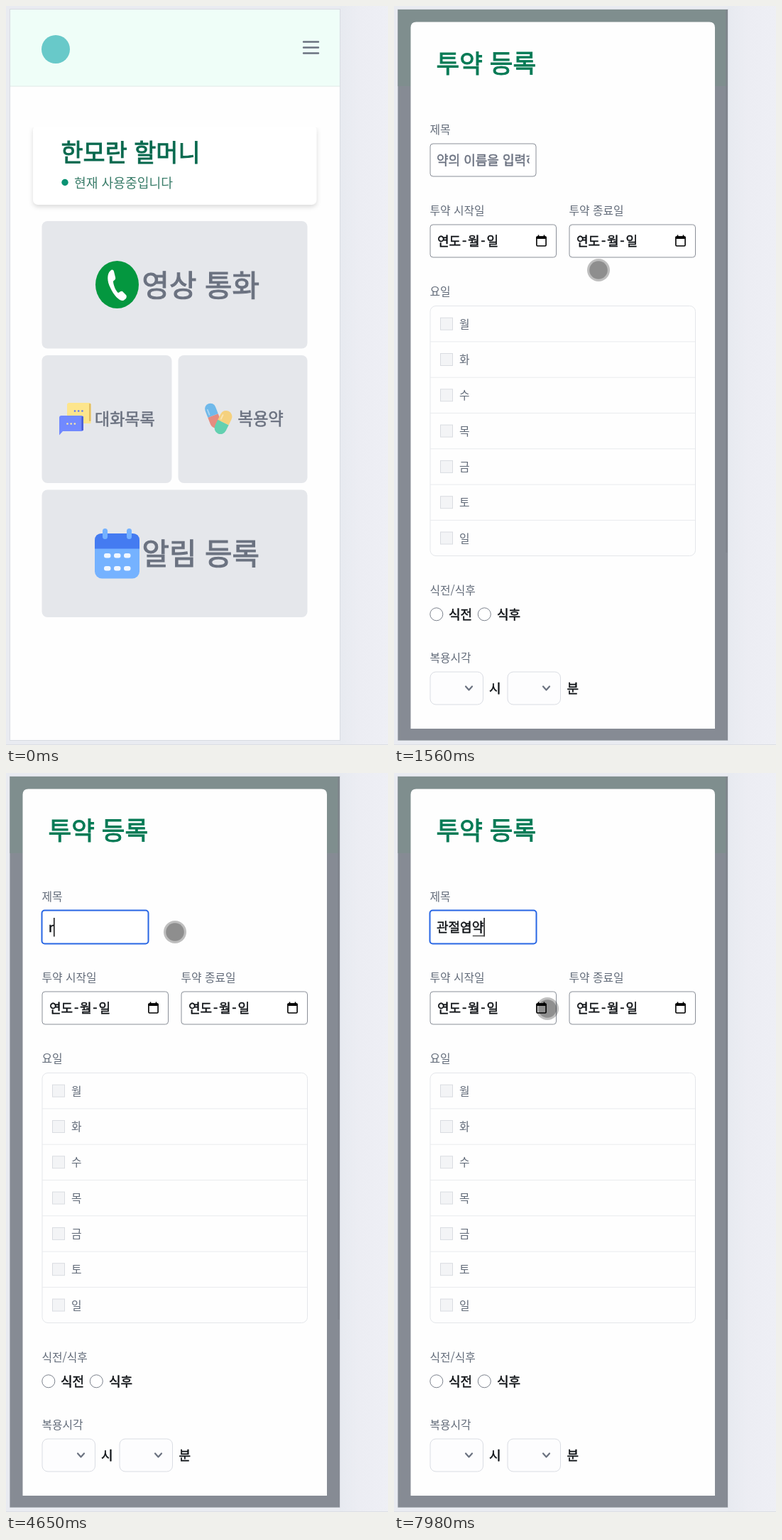
These frames come from a looping animation (538x1041 px, 8000 ms). An HTML page:

```html
<!DOCTYPE html>
<html lang="ko">
<head>
<meta charset="utf-8">
<title>투약 등록</title>
<style>
  html, body { margin: 0; width: 100%; height: 100%; overflow: hidden; background: #ebedf3; }
  svg { display: block; width: 538px; height: 1041px; }
  text { font-family: "Noto Sans CJK KR", "Noto Sans CJK", "Noto Sans", sans-serif; white-space: pre; }
  .card { filter: drop-shadow(0 3px 3px rgba(0, 0, 0, .14)); }
</style>
</head>
<body>
<svg id="stage" viewBox="0 0 538 1041" xmlns="http://www.w3.org/2000/svg"></svg>
<script>
const LOOP = 8000;
const GRAY = '#6b7280', GREEN = '#057a55', INK = '#111418', LABEL = '#626b79';

const box = (x1, y1, x2, y2, r, fill, stroke = 'none', w = 1, extra = '') =>
  `<rect x="${x1}" y="${y1}" width="${x2 - x1}" height="${y2 - y1}" rx="${r}" fill="${fill}" stroke="${stroke}" stroke-width="${w}" ${extra}/>`;
const dot = (x, y, r, fill, stroke = 'none') =>
  `<circle cx="${x}" cy="${y}" r="${r}" fill="${fill}" stroke="${stroke}"/>`;
const line = (d, stroke, w, cap = 'butt') =>
  `<path d="${d}" fill="none" stroke="${stroke}" stroke-width="${w}" stroke-linecap="${cap}" stroke-linejoin="${cap === 'butt' ? 'miter' : 'round'}"/>`;
const shape = (d, fill) => `<path d="${d}" fill="${fill}"/>`;
// y is the middle of the glyphs
const text = (x, y, size, str, fill, extra = '') =>
  `<text x="${x}" y="${y + size * .37}" font-size="${size}" fill="${fill}" ${extra}>${str}</text>`;
// a thin outline stands in for a medium weight
const strong = (x, y, size, str, fill, extra = '') =>
  text(x, y, size, str, fill, `stroke="${fill}" stroke-width="${size * .027}" ${extra}`);
const label = (x, y, str) => text(x, y, 15.8, str, LABEL);
const range = n => [...Array(n).keys()];

function phoneIcon() {
  return '<ellipse cx="156.5" cy="392.5" rx="30.5" ry="33.5" fill="#04973f"/>' +
    shape('M147 373C142 377 142 388 147 397C152 408 160 416 165 415C169 413 171 410 169 407L164 402C161 401 160 404 158 404C155 402 151 393 151 388C152 386 155 386 154 382L152 374C151 371 149 371 147 373Z', '#fff');
}

function chatIcon() {
  const dots = (x, y, fill) => range(3).map(i => dot(x + i * 5.2, y, 1.3, fill)).join('');
  return shape('M89 559H117Q119.500 559 119.500 562V588H86V562Q86 559 89 559Z', '#fde58c') +
    box(117, 560, 119.5, 585, 1, '#e2bd62') + dots(97, 570.5, '#5f78ee') +
    shape('M75 580Q75 577 78 577H106Q109 577 109 580V596Q109 599 106 599H80L75 604.500Z', '#7189ff') +
    box(106.3, 578, 109, 598, 1, '#4b5fd8') + dots(86.5, 588.5, '#fdeaa8');
}

function pill(x, y, angle, len, w, top, bottom) {
  const h = len / 2, r = w / 2;
  const end = `V${h - r}A${r} ${r} 0 0 1 ${-r} ${h - r}V0Z`;
  return `<g transform="translate(${x} ${y}) rotate(${angle})">` +
    shape(`M${-r} 0H${r}${end}`, bottom) +
    `<g transform="rotate(180)">${shape(`M${-r} 0H${r}${end}`, top)}</g>` +
    line(`M${-r + 3.5} ${-h + r}V${-3}`, 'rgba(255,255,255,.4)', 2, 'round') + '</g>';
}

function calendarIcon() {
  const cells = range(6).map(i => {
    const x = 138 + (i % 3) * 14, y = i < 3 ? 771 : 789;
    return box(x, y, x + 9.5, y + 6.5, 3, '#f1f7ff');
  }).join('');
  return box(125, 743, 188, 806.5, 10, '#75b2ff') +
    shape('M125 764.500V753Q125 743 135 743H178Q188 743 188 753V764.500Z', '#447bf1') +
    box(136, 736, 143, 751, 3.5, '#75b2ff') + box(170, 736, 177, 751, 3.5, '#75b2ff') + cells;
}

function homeView() {
  const tile = (x1, y1, x2, y2) => box(x1, y1, x2, y2, 8, '#e5e7eb');
  return box(6, 5, 470, 1034, 0, '#fefefe') +
    box(6, 5, 470, 113, 0, '#effef8') + line('M6 113H470', '#e0e9e6', 1) +
    dot(70, 61, 20, '#68c9c9') +
    line('M419 50.500H440M419 58.500H440M419 66.500H440', GRAY, 2.4, 'round') +
    box(38, 168, 437.5, 280, 7, '#fff', 'none', 0, 'class="card"') +
    box(30, 150, 446, 171, 0, '#fefefe') +
    strong(77.5, 206, 33.8, '한모란 할머니', '#08694e') +
    dot(83, 248.5, 4.7, '#0a9273') +
    text(96, 249, 18.2, '현재 사용중입니다', '#3a7d6a') +
    tile(50.5, 303, 424.5, 482.5) + phoneIcon() + strong(191.5, 393.5, 41.8, '영상 통화', GRAY) +
    tile(50.5, 492, 233.5, 672) + chatIcon() + strong(125, 581.5, 23, '대화목록', GRAY) +
    tile(242.5, 492, 424.5, 672) +
    pill(291.5, 577, -21, 36, 15.5, '#6fb9ea', '#e58c80') +
    pill(306, 586.5, 26, 35, 17, '#f5d17e', '#63d0b0') +
    strong(326.5, 581.5, 23.3, '복용약', GRAY) +
    tile(50.5, 681.5, 424.5, 861) + calendarIcon() + strong(191.5, 772, 41.8, '알림 등록', GRAY);
}

function dateField(x1, x2) {
  const ix = x2 - 28.5;
  const parts = '연도<tspan dx="1.8">-</tspan><tspan dx="1.8">월</tspan><tspan dx="1.8">-</tspan><tspan dx="1.8">일</tspan>';
  return box(x1, 308, x2, 354, 4, '#fff', '#8a8f98') +
    strong(x1 + 10, 331, 18, parts, INK) +
    box(ix + .9, 325, ix + 14.1, 338, 1.2, 'none', '#000', 1.6) +
    box(ix + .5, 324.5, ix + 14.5, 328, 1, '#000') +
    line(`M${ix + 3.5} 322.500V326M${ix + 11.5} 322.500V326`, '#000', 1.6);
}

function select(x) {
  return box(x, 938, x + 74.5, 984, 8, '#fdfdfe', '#dadde3') +
    line(`M${x + 50} 958.500L${x + 54.5} 963.500L${x + 59} 958.500`, GRAY, 2.2, 'round');
}

function formView() {
  const days = [...'월화수목금토일'].map((day, i) => {
    const y = 447.7 + i * 50.3;
    return box(65.5, y - 8.5, 82.5, y + 8.5, 0, '#f3f4f6', '#d9dce1') + label(92, y + .3, day) +
      (i ? line(`M51 ${y - 25.1}H424`, '#e9ebee', 1) : '');
  }).join('');
  return box(5.5, 5, 470, 1034.5, 0, '#868b94') + box(5.5, 5, 470, 113, 0, '#7f8e8e') +
    box(467, 5, 470, 770, 0, '#7f828a', 'none', 0, 'opacity=".6"') +
    shape('M23.500 1018V30.500Q23.500 22.500 31.500 22.500H444Q452 22.500 452 30.500V1018Z', '#fefefe') +
    strong(59.5, 80.5, 35.5, '투약 등록', GREEN) +
    label(50.5, 174, '제목') +
    '<rect id="field" fill="#fff"/>' +
    `<g clip-path="url(#fieldClip)">${strong(60, 217, 18, '약의 이름을 입력하세요', GRAY, 'id="hint"')}` +
    strong(60, 217, 18, '', INK, 'id="typed"') + '</g>' +
    '<rect id="under" y="229" height="1" width="15.500" fill="#111"/>' +
    '<rect id="caret" y="204" height="26.500" width="1.400" fill="#000"/>' +
    label(50.5, 288.5, '투약 시작일') + label(246.5, 288.5, '투약 종료일') +
    dateField(51, 228.5) + dateField(247, 424.5) +
    label(50.5, 402, '요일') +
    box(51, 422.5, 424.5, 774.5, 8, 'none', '#e4e6ea') + days +
    label(50.5, 823, '식전/식후') +
    dot(59.8, 856.8, 9, '#fff', '#7b818c') + strong(77, 857, 18, '식전', INK) +
    dot(127.3, 856.8, 9, '#fff', '#7b818c') + strong(145, 857, 18, '식후', INK) +
    label(50.5, 918, '복용시각') +
    select(51) + strong(134, 961, 18, '시', INK) +
    select(160) + strong(243.5, 961, 18, '분', INK);
}

const stage = document.getElementById('stage');
stage.innerHTML = `<defs>
  <linearGradient id="side" x1="470" x2="538" y1="0" y2="0" gradientUnits="userSpaceOnUse">
    <stop offset="0" stop-color="#e7eaf0"/><stop offset=".4" stop-color="#ecedf3"/><stop offset="1" stop-color="#eeeff5"/>
  </linearGradient>
  <clipPath id="fieldClip"><rect x="58" y="196" width="132.500" height="42"/></clipPath></defs>` +
  box(0, 0, 538, 1041, 0, '#e9ebf1') + box(470, 0, 538, 1041, 0, 'url(#side)') +
  line('M0 1040.500H538', '#dcdee4', 1) +
  box(5.5, 4.5, 470.5, 1034.5, 0, '#fefefe', '#d8dbe2') +
  `<g id="home">${homeView()}</g><g id="form">${formView()}</g>` +
  `<g id="pointer">${dot(0, 0, 16, 'rgba(0,0,0,.25)')}${dot(0, 0, 12.8, 'rgba(0,0,0,.25)')}</g>`;

const [home, form, field, hint, typed, under, caret, pointer] =
  ['home', 'form', 'field', 'hint', 'typed', 'under', 'caret', 'pointer'].map(id => document.getElementById(id));

// Pointer strokes: start, end, then evenly timed stops
const strokes = [
  [500, 1040, [[461, 640], [425, 618], [385, 594], [355, 580], [342, 573], [338, 571], [338, 571], [341, 572]]],
  [1300, 1840, [[340, 565], [338, 545], [325, 463], [288, 372], [235, 298], [192, 248], [165, 227], [152, 219], [150, 218]]],
  [3580, 4050, [[152, 217], [160, 214], [173, 212], [188, 212], [206, 212], [223, 216], [234, 221], [238, 224]]],
  [7380, 7980, [[239, 226], [239, 230], [238, 244], [235, 268], [230, 293], [224, 313], [219, 325], [217, 330], [216, 332]]]
];

const typing = [
  [0, ''], [4580, 'r'], [4680, 'rh'], [4780, 'rhk'], [5110, 'rh'], [5200, 'r'], [5270, ''],
  [5530, 'ㄱ'], [5600, '고'], [5660, '과'], [5850, '관'],
  [6050, '관ㅈ'], [6150, '관저'], [6250, '관절'],
  [6390, '관절ㅇ'], [6490, '관절여'], [6580, '관절염'],
  [6780, '관절염ㅇ'], [6880, '관절염야'], [6980, '관절염약']
];

const blink = [[0, false], [1990, true], [2590, false], [3050, true], [3580, false], [4050, true], [7480, false], [7980, true]];

const at = (table, t) => table.findLast(row => row[0] <= t);
const show = (el, on) => el.setAttribute('visibility', on ? 'visible' : 'hidden');
const set = (el, attrs) => Object.entries(attrs).forEach(([k, v]) => el.setAttribute(k, v));

function draw(t) {
  const opened = t >= 900, focused = t >= 1990;
  home.style.display = opened ? 'none' : '';
  form.style.display = opened ? '' : 'none';

  const stroke = at(strokes, t);
  show(pointer, stroke);
  if (stroke) {
    const [from, to, stops] = stroke;
    const last = stops.length - 1;
    const step = Math.min(last, Math.floor((t - from) / (to - from) * last + .001));
    pointer.setAttribute('transform', `translate(${stops[step]})`);
  }
  if (!opened) return;

  set(field, focused
    ? { x: 50.5, y: 193.5, width: 150, height: 47, rx: 4, stroke: '#2866e4', 'stroke-width': 2 }
    : { x: 51, y: 194, width: 149, height: 46, rx: 4, stroke: '#8a8f98', 'stroke-width': 1 });

  const value = at(typing, t)[1];
  if (typed.textContent !== value) typed.textContent = value;
  show(hint, !value);
  const end = 60.5 + (value ? typed.getComputedTextLength() : 0);
  caret.setAttribute('x', end - .4);
  show(caret, at(blink, t)[1]);
  under.setAttribute('x', end - 16);
  show(under, t >= 5530);
}

function tick() {
  draw(performance.now() % LOOP);
  requestAnimationFrame(tick);
}
tick();
</script>
</body>
</html>
```
